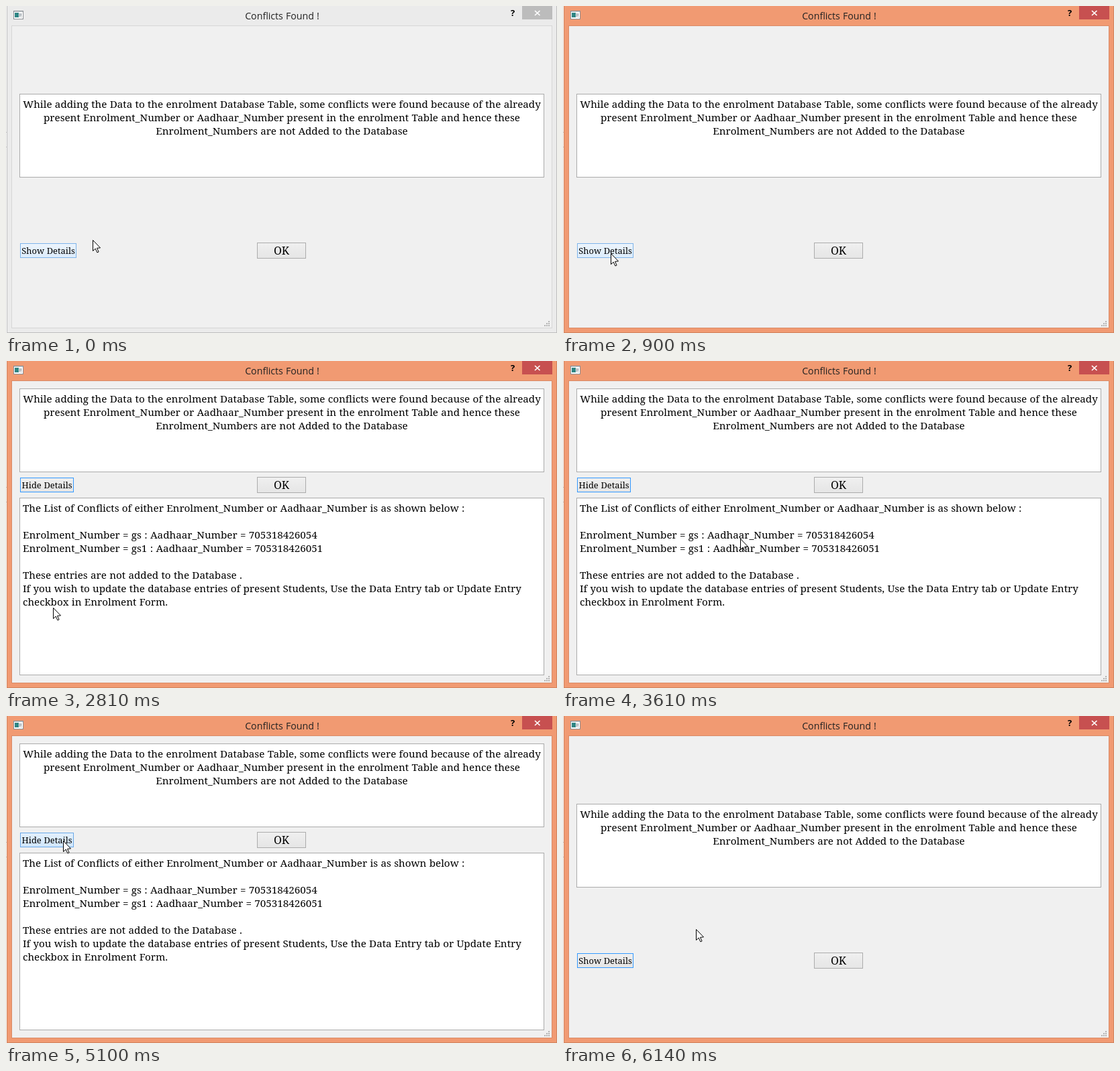
An HTML page with a canvas that plays this animation: 821x488 px, repeating every 8000 ms.

```html
<!DOCTYPE html>
<html lang="en">
<head>
<meta charset="utf-8">
<title>Conflicts Found !</title>
<style>
html, body { margin: 0; width: 100%; height: 100%; overflow: hidden; background: #fff; }
canvas { display: block; width: 821px; height: 488px; }
</style>
</head>
<body>
<canvas id="stage" width="821" height="488"></canvas>
<script>
const ctx = document.getElementById('stage').getContext('2d');
const LOOP = 8000;
const SERIF = '"Noto Serif", serif';
const SANS = '"Open Sans", sans-serif';
ctx.wordSpacing = '0.4px';

const MESSAGE = [
  'While adding the Data to the enrolment Database Table, some conflicts were found because of the already',
  'present Enrolment_Number or Aadhaar_Number present in the enrolment Table and hence these',
  'Enrolment_Numbers are not Added to the Database'
];
const DETAILS = [
  'The List of Conflicts of either Enrolment_Number or Aadhaar_Number is as shown below :',
  '',
  'Enrolment_Number = gs : Aadhaar_Number = 705318426054',
  'Enrolment_Number = gs1 : Aadhaar_Number = 705318426051',
  '',
  'These entries are not added to the Database .',
  'If you wish to update the database entries of present Students, Use the Data Entry tab or Update Entry',
  'checkbox in Enrolment Form.'
];

// Button looks: border, top and bottom of the fill
const LOOK = {
  normal: ['#acacac', '#f0f0f0', '#e5e5e5'],
  focus: ['#3399ff', '#f0f0f0', '#e5e5e5'],
  hover: ['#7eb4ea', '#ecf4fc', '#dcecfc'],
  half: ['#6aa9e8', '#e3f0fc', '#d0e6fc'],
  pressed: ['#569de5', '#daecfc', '#c4e0fc']
};

// Pointer moves: begin, end, steps, then start, control and end points
const MOVES = [
  { t0: 50, t1: 840, n: 13, a: [129, 349], c: [98, 364], b: [72, 369] },
  { t0: 900, t1: 900, n: 1, a: [72, 369], c: [71, 369], b: [71, 369] },
  { t0: 2810, t1: 3610, n: 14, a: [71, 369], c: [40, 320], b: [264, 265] },
  { t0: 3860, t1: 4620, n: 13, a: [264, 265], c: [200, 304], b: [85, 186] },
  { t0: 5340, t1: 6140, n: 15, a: [85, 186], c: [132, 262], b: [198, 318] }
];

function fill(color, x, y, w, h) {
  ctx.fillStyle = color;
  ctx.fillRect(x, y, w, h);
}

function frame(color, x, y, w, h) {
  ctx.strokeStyle = color;
  ctx.lineWidth = 1;
  ctx.strokeRect(x + 0.5, y + 0.5, w - 1, h - 1);
}

function text(str, x, y, font, align = 'left', color = '#000') {
  ctx.font = font;
  ctx.textAlign = align;
  ctx.fillStyle = color;
  ctx.fillText(str, x, y);
}

function paragraph(lines, x, y, align) {
  lines.forEach((s, i) => text(s, x, y + i * 20, '15.2px ' + SERIF, align));
}

function textBox(y, h) {
  fill('#fff', 20, y, 782, h);
  frame('#ababab', 20, y, 782, h);
}

function button(label, x, y, w, h, look, size) {
  const [edge, top, bottom] = LOOK[look];
  const g = ctx.createLinearGradient(0, y, 0, y + h);
  g.addColorStop(0, top);
  g.addColorStop(1, bottom);
  fill(g, x, y, w, h);
  frame(edge, x, y, w, h);
  text(label, x + w / 2, y + h / 2 + size * 0.37, size + 'px ' + SERIF, 'center');
}

function appIcon() {
  fill('#fff', 11, 7, 15, 13);
  frame('#8a8f94', 11, 7, 15, 13);
  fill('#c9ced2', 12, 8, 13, 1);
  fill('#2f8584', 13, 10, 6, 7);
  fill('#7c8790', 20, 11, 1, 5);
  fill('#7c8790', 22, 11, 1, 4);
  fill('#7c8790', 22, 16, 1, 1);
}

function windowFrame(active) {
  fill('#fff', 0, 0, 821, 488);
  fill('#c8c8c8', 0, 188, 1, 1);
  fill('#c8c8c8', 0, 210, 1, 1);
  fill(active ? '#f19a72' : '#ebebeb', 1, 0, 820, 488);
  const edge = active ? '#d0845f' : '#bebebe';
  fill(edge, 1, 0, 1, 488);
  fill(edge, 820, 0, 1, 488);
  fill(edge, 1, 487, 820, 1);
  fill('#f0f0f0', 8, 29, 806, 452);
  frame(active ? '#d98b67' : '#d6d6d6', 8, 29, 806, 452);

  appIcon();
  text('Conflicts Found !', 411.5, 20, '14.2px ' + SANS, 'center', '#222');
  text('?', 755, 15, 'bold 13px ' + SANS, 'center');

  fill(active ? '#c75050' : '#bcbcbc', 769, 0, 45, 20);
  ctx.strokeStyle = '#fff';
  ctx.lineWidth = 1.7;
  ctx.beginPath();
  ctx.moveTo(788, 7);
  ctx.lineTo(795.5, 14);
  ctx.moveTo(795.5, 7);
  ctx.lineTo(788, 14);
  ctx.stroke();

  for (let row = 0; row < 3; row++)
    for (let col = 2 - row; col < 3; col++)
      fill('#b4b4b4', 802 + col * 3, 470 + row * 3, 2, 2);
}

function pointerAt(t) {
  let pos = MOVES[0].a;
  for (const { t0, t1, n, a, c, b } of MOVES) {
    if (t < t0) break;
    const step = n > 1 ? Math.floor((t - t0) / ((t1 - t0) / (n - 1)) + 1e-6) + 1 : 1;
    const p = Math.min(step / n, 1);
    const u = p * p * (3 - 2 * p), v = 1 - u;
    pos = a.map((s, i) => Math.round(v * v * s + 2 * u * v * c[i] + u * u * b[i]));
  }
  return pos;
}

function pointer(x, y) {
  const shape = [[0, 0], [0, 16], [3.7, 12.6], [6.4, 18.4], [8.6, 17.4], [6, 11.8], [11, 11.4]];
  ctx.beginPath();
  shape.forEach(([dx, dy]) => ctx.lineTo(x + dx + 0.5, y + dy + 0.5));
  ctx.closePath();
  ctx.fillStyle = '#fff';
  ctx.fill();
  ctx.strokeStyle = '#000';
  ctx.lineWidth = 1;
  ctx.stroke();
}

function clickRing(x, y) {
  ctx.strokeStyle = '#1c2733';
  ctx.lineWidth = 1;
  ctx.beginPath();
  ctx.arc(x + 1, y + 0.5, 10, 0, Math.PI * 2);
  ctx.stroke();
}

function toggleLook(t) {
  if (t < 1770) return 'hover';
  if (t < 1855) return 'half';
  if (t < 2130) return 'pressed';
  if (t < 4740) return 'focus';
  if (t < 4990) return 'hover';
  if (t < 5100) return 'pressed';
  if (t < 5160) return 'half';
  return 'focus';
}

function draw(t) {
  const open = t >= 2130 && t < 5160;
  const top = open ? 41 : 131;
  windowFrame(t >= 50);

  textBox(top, 125);
  paragraph(MESSAGE, 411, top + 21, 'center');

  const y = open ? 174 : 354;
  button(open ? 'Hide Details' : 'Show Details', 21, y, open ? 80 : 84, 22, toggleLook(t), 12.9);
  button('OK', 374, y - 1, 73, 24, 'normal', 16);

  if (open) {
    textBox(204, 265);
    paragraph(DETAILS, 25, 225, 'left');
  }

  const [px, py] = pointerAt(t);
  if ((t >= 1770 && t < 2130) || (t >= 4990 && t < 5100)) clickRing(px, py);
  pointer(px, py);
}

const start = performance.now();
function tick() {
  draw((performance.now() - start) % LOOP);
  requestAnimationFrame(tick);
}
tick();
</script>
</body>
</html>
```
